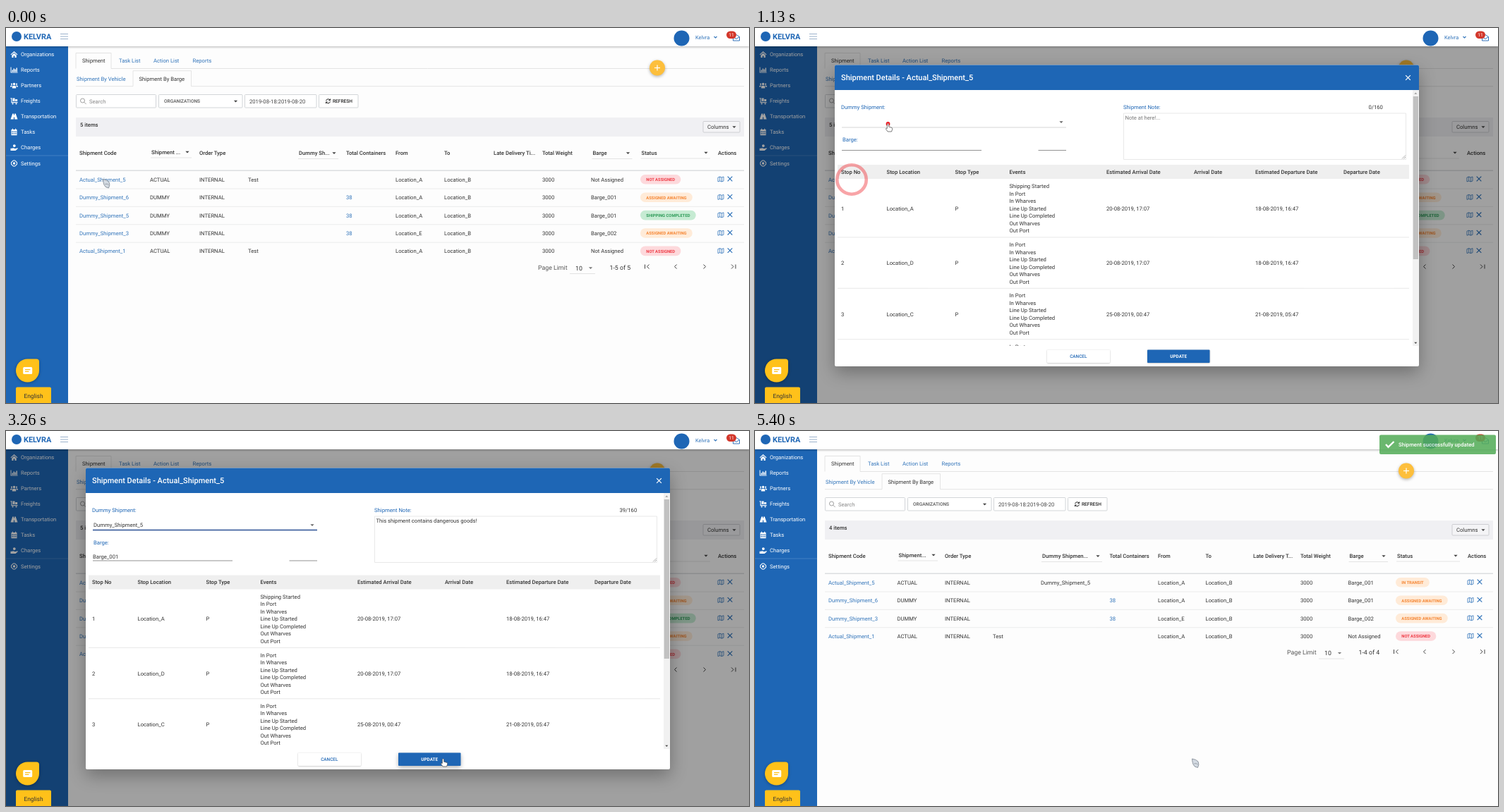
Recreate the animation shown at these times as an HTML page with a canvas. Size 1053 by 532 pixels, loop 5730 ms.

```html
<!DOCTYPE html>
<html lang="en">
<head>
<meta charset="utf-8">
<title>Shipment update</title>
<style>
html, body { margin: 0; width: 100%; height: 100%; overflow: hidden; background: #fff; }
canvas { display: block; }
</style>
</head>
<body>
<canvas id="stage" width="1053" height="532"></canvas>
<script>
const W = 1053, H = 532, LOOP = 5730, STEP = 200 / 3;
const BLUE = '#1e66b5', LINK = '#3174ba', INK = '#333', RULE = '#ddd', FS = 7.68;
const stage = document.getElementById('stage');
const buffer = Object.assign(document.createElement('canvas'), { width: W, height: H }).getContext('2d');
let c = stage.getContext('2d');
c.textRendering = buffer.textRendering = 'geometricPrecision';

const clamp = v => Math.max(0, Math.min(1, v));
const span = (t, from, length) => clamp((t - from) / length);
const mix = (a, b, p) => a + (b - a) * p;
const smooth = p => p * p * (3 - 2 * p);

// Drawing helpers; text y is the middle of the capitals
function text(s, x, y, color = INK, size = FS, weight = 400, align = 'left') {
  c.font = `${weight} ${size}px Roboto, sans-serif`;
  c.textAlign = align;
  c.fillStyle = color;
  c.fillText(s, x, y + size * .36);
}
function line(color, width, ...p) {
  c.beginPath();
  for (let i = 0; i < p.length; i += 2) c.lineTo(p[i], p[i + 1]);
  c.strokeStyle = color;
  c.lineWidth = width;
  c.stroke();
}
function box(x, y, w, h, fill, stroke, r = 0) {
  c.beginPath();
  c.roundRect(x, y, w, h, r);
  if (fill) { c.fillStyle = fill; c.fill(); }
  if (stroke) { c.strokeStyle = stroke; c.lineWidth = .8; c.stroke(); }
}
function disc(x, y, r, fill) {
  c.beginPath();
  c.arc(x, y, r, 0, 7);
  c.fillStyle = fill;
  c.fill();
}
function icon(d, x, y, fill, stroke, width = .8) {
  const p = new Path2D(d);
  c.save();
  c.translate(x, y);
  if (fill) { c.fillStyle = fill; c.fill(p, 'evenodd'); }
  if (stroke) { c.strokeStyle = stroke; c.lineWidth = width; c.stroke(p); }
  c.restore();
}
function shadowed(blur, dy, draw) {
  c.save();
  c.shadowColor = 'rgba(0,0,0,.3)';
  c.shadowBlur = blur;
  c.shadowOffsetY = dy;
  draw();
  c.restore();
}
function layer(alpha, draw) {
  const main = c;
  c = buffer;
  c.resetTransform();
  c.clearRect(0, 0, W, H);
  draw();
  c = main;
  c.globalAlpha = alpha;
  c.drawImage(buffer.canvas, 0, 0);
  c.globalAlpha = 1;
}
const caret = (x, y, color = '#444') => icon('M-2.6-1.2H2.6L0 1.5Z', x, y, color);
const cross = (x, y, r, color, width) => {
  line(color, width, x - r, y - r, x + r, y + r);
  line(color, width, x - r, y + r, x + r, y - r);
};

const NAV = [
  ['Organizations', 37.5, 'M0 5L5 .5L10 5L9.2 5.8L5 2.2L.8 5.8ZM1.8 6L5 3.3L8.2 6V9.5H6V7H4V9.5H1.8Z'],
  ['Reports', 59.5, 'M0 1H1V8H10V9H0ZM2 5H3.4V7.4H2ZM4 3H5.4V7.4H4ZM6 4H7.4V7.4H6ZM8 2H9.4V7.4H8Z'],
  ['Partners', 81.5, 'M3.3 3a1.7 1.7 0 1 0 3.4 0a1.7 1.7 0 1 0-3.4 0M2.3 9V7.5Q2.3 5.3 5 5.3T7.7 7.5V9ZM.4 3.2a1.1 1.1 0 1 0 2.2 0a1.1 1.1 0 1 0-2.2 0M7.4 3.2a1.1 1.1 0 1 0 2.2 0a1.1 1.1 0 1 0-2.2 0M-.5 7V6Q0 4.8 2.6 5L1.6 7ZM10.5 7V6Q10 4.8 7.4 5L8.4 7Z'],
  ['Freights', 103.5, 'M0 .8H2V6.6H10V7.8H.9V2H0ZM3 1H6V5.6H3ZM6.6 2.5H9.6V5.6H6.6ZM2 9a1 1 0 1 0 2 0a1 1 0 1 0-2 0M7 9a1 1 0 1 0 2 0a1 1 0 1 0-2 0'],
  ['Transportation', 125.5, 'M2.8 1H4.5V3H5.5V1H7.2L10 9H5.6V6H4.4V9H0Z'],
  ['Tasks', 147.5, 'M1 1.5H2.3V.3H3.5V1.5H6.5V.3H7.7V1.5H9V9.7H1ZM2 4H3.4V5.4H2ZM4.3 4H5.7V5.4H4.3ZM6.6 4H8V5.4H6.6ZM2 6.6H3.4V8H2ZM4.3 6.6H5.7V8H4.3ZM6.6 6.6H8V8H6.6Z'],
  ['Charges', 169.5, 'M0 6.2H1.8Q4 5 5.6 6.6H7.6L10 5.6V7L7 9.4H0ZM3.4 2.6a1.9 1.9 0 1 0 3.8 0a1.9 1.9 0 1 0-3.8 0'],
  ['Settings', 192, 'M3.6.5H6.4L9.5 3.6V6.4L6.4 9.5H3.6L.5 6.4V3.6ZM4 1.5L1.5 4V6L4 8.5H6L8.5 6V4L6 1.5ZM3.2 5a1.8 1.8 0 1 0 3.6 0a1.8 1.8 0 1 0-3.6 0']
];
const CHIPS = {
  'NOT ASSIGNED': ['#fdd9dc', '#ef3b45'],
  'SHIPPING COMPLETED': ['#c6ebd3', '#2c9a57'],
  other: ['#ffebd8', '#f58634']
};
const row = s => s.split('|');
const BEFORE = {
  cols: [104, 204, 274, 343, 415, 482, 552, 621, 691, 760, 829, 899, 1009],
  heads: row('Shipment Code||Order Type|||Total Containers|From|To|Late Delivery Ti...|Total Weight|||Actions'),
  filters: [['Shipment ...', 206, 257, 176], ['Dummy Sh...', 415, 465, 177.5], ['Barge', 831.5, 881.5, 177.5], ['Status', 900.5, 992, 177]],
  rows: [
    'Actual_Shipment_5|ACTUAL|INTERNAL|Test|||Location_A|Location_B||3000|Not Assigned|NOT ASSIGNED',
    'Dummy_Shipment_6|DUMMY|INTERNAL|||38|Location_A|Location_B||3000|Barge_001|ASSIGNED AWAITING',
    'Dummy_Shipment_5|DUMMY|INTERNAL|||38|Location_A|Location_B||3000|Barge_001|SHIPPING COMPLETED',
    'Dummy_Shipment_3|DUMMY|INTERNAL|||38|Location_E|Location_B||3000|Barge_002|ASSIGNED AWAITING',
    'Actual_Shipment_1|ACTUAL|INTERNAL|Test|||Location_A|Location_B||3000|Not Assigned|NOT ASSIGNED'
  ].map(row)
};
const AFTER = {
  cols: [104, 201.5, 269, 337, 405, 502.5, 571, 638.5, 706, 773, 840.5, 908, 1010],
  heads: BEFORE.heads.map(h => h.replace('y Ti', 'y T')),
  filters: [['Shipment...', 203.5, 253, 176], ['Dummy Shipmen...', 407, 486, 177.5], ['Barge', 842.5, 891, 177.5], ['Status', 910, 993, 177]],
  rows: [
    'Actual_Shipment_5|ACTUAL|INTERNAL||Dummy_Shipment_5||Location_A|Location_B||3000|Barge_001|IN TRANSIT',
    ...[1, 3, 4].map(i => BEFORE.rows[i].join('|'))
  ].map(row)
};

function drawTable({ cols, heads, filters, rows }) {
  const n = rows.length;
  text(n + ' items', 105, 137.5, INK, FS, 500);
  heads.forEach((h, i) => text(h, cols[i], 177, INK, FS, 500));
  for (const [label, x, arrow, y] of filters) {
    text(label, x, y, INK, FS, 500);
    caret(arrow, y);
    line(RULE, .8, x - 1, y + 8, arrow + 6, y + 8);
  }
  line('#dcdee0', 1.6, 99, 202.3, 1046, 202.3);
  rows.forEach((cells, r) => {
    const y = 215 + 25.4 * r;
    cells.forEach((s, i) => {
      if (i < 11) return text(s, cols[i], y, i == 0 || i == 5 ? LINK : INK);
      const [bg, fg] = CHIPS[s] || CHIPS.other;
      c.font = '700 5.85px Roboto, sans-serif';
      box(cols[i], y - 7, c.measureText(s).width + 16.5, 13.6, bg, 0, 6.8);
      text(s, cols[i] + 8.3, y, fg, 5.85, 700);
    });
    const x = cols[12];
    icon('M0 1L2.7 0L5.4 1L8 0V6L5.4 7L2.7 6L0 7ZM2.7 0V6M5.4 1V7', x, y - 4, 0, LINK);
    cross(x + 17, y - 1, 3.3, LINK, 1.2);
    if (r < n - 1) line('#e6e7e8', .8, 99, y + 13, 1046, y + 13);
  });
  const y = 212.5 + 25.4 * n;
  text('Page Limit', 754, y, '#555', 8.77);
  text('10', 807, y + 1, INK, 8.77);
  caret(828.5, y + 1, '#777');
  line(RULE, .8, 799, y + 9, 835, y + 9);
  text(`1-${n} of ${n}`, 855.5, y, INK, 8.77);
  icon('M-3-3V3M3-3L0 0L3 3', 908.5, y - 1, 0, '#444', 1);
  icon('M1.5-3L-1.5 0L1.5 3', 949, y - 1, 0, '#444', 1);
  icon('M-1.5-3L1.5 0L-1.5 3', 990, y - 1, 0, '#444', 1);
  icon('M3-3V3M-3-3L0 0L-3 3', 1031, y - 1, 0, '#444', 1);
}

function drawPage(t) {
  box(0, 0, W, H, '#fdfdfd');
  box(0, 26, 88, H - 26, BLUE);
  for (const [label, y, shape] of NAV) {
    icon(shape, 6.5, y - 5, '#fff');
    text(label, 21, y, '#fff');
  }
  line('#4b87c6', .8, 0, 181, 88, 181);

  line(RULE, .8, 99, 57.5, 99, 35.5, 149, 35.5, 149, 57.5, 1046, 57.5);
  text('Shipment', 108, 46.5);
  text('Task List', 160, 46.5, LINK);
  text('Action List', 209, 46.5, LINK);
  text('Reports', 264.5, 46.5, LINK);
  line(RULE, .8, 99, 82.7, 180, 82.7, 180, 60.7, 262.5, 60.7, 262.5, 82.7, 1046, 82.7);
  text('Shipment By Vehicle', 100, 72, LINK);
  text('Shipment By Barge', 188.5, 72);
  shadowed(4, 1.5, () => disc(923, 56.5, 11, '#fdbf3c'));
  line('#fff', 1.2, 919, 56.5, 927, 56.5);
  line('#fff', 1.2, 923, 52.5, 923, 60.5);

  for (const [x, w] of [[99.5, 113], [216.5, 118.5], [338.5, 101.5], [443.5, 55.5]]) box(x, 94.5, w, 18.5, '#fff', '#c8ccd0', 1);
  icon('M.5 3.5a3 3 0 1 0 6 0a3 3 0 1 0-6 0M5.6 5.6L8.6 8.6', 105, 99.5, 0, '#888');
  text('Search', 118, 104, '#888');
  text('ORGANIZATIONS', 224, 104, '#555', 6.58, 500);
  caret(325.5, 104);
  text('2019-08-18:2019-08-20', 345, 104, '#444');
  icon('M.6 3A3 3 0 0 1 6 1.8M6.4 4A3 3 0 0 1 1 5.2M6.5.2V2.3H4.4M.5 6.8V4.7H2.6', 453, 100.3, 0, '#222', 1);
  text('REFRESH', 463, 104, '#222', 6.58, 500);
  box(99, 127, 947, 27, '#f0f0f3');
  box(988, 132.5, 52, 15.5, '#f4f4f6', '#c4c6ca', 1);
  text('Columns', 994, 140.5);
  caret(1032, 140.5);
  drawTable(t < 5120 ? BEFORE : AFTER);
}

// Parts that stay bright above the dimmed page
function drawChrome() {
  shadowed(3, 1, () => box(0, 0, W, 26, '#fff'));
  disc(15, 12, 7, BLUE);
  text('KELVRA', 25, 12.5, BLUE, 10.9, 700);
  for (const y of [8.5, 12, 15.5]) line('#8fa9c6', .9, 77, y, 88, y);
  disc(957.5, 14.5, 11, BLUE);
  text('Kelvra', 977, 13, LINK, 7.4);
  icon('M-2-1L0 1L2-1', 1005.5, 13, 0, LINK, 1.1);
  icon('M0 3L4.5 0L9 3V8.5H0ZM0 3L4.5 6L9 3', 1030.5, 9.5, '#fff', BLUE, .9);
  box(1021, 4.5, 14, 10.5, '#d3372b', 0, 5.2);
  text('11', 1028, 9.8, '#fff', 6.6, 400, 'center');
  shadowed(4, 1, () => box(14, 469.5, 33, 33, '#ffc11a', 0, [16.5, 4, 16.5, 16.5]));
  icon('M1.5 0H11.5Q13 0 13 1.5V8.5Q13 10 11.5 10H1.5Q0 10 0 8.5V1.5Q0 0 1.5 0ZM2.8 3H10.2V4.2H2.8ZM2.8 5.7H8.2V6.9H2.8Z', 24.2, 481, '#fff');
  box(14, 509.5, 50, 23, '#ffc11a', 0, [2, 2, 0, 0]);
  text('English', 39, 522, '#333', 8.4, 400, 'center');
}

const STOP_COLS = [122, 186.5, 283.5, 360.5, 498, 622, 709, 834];
const STOP_HEADS = row('Stop No|Stop Location|Stop Type|Events|Estimated Arrival Date|Arrival Date|Estimated Departure Date|Departure Date');
const EVENTS = row('Shipping Started|In Port|In Wharves|Line Up Started|Line Up Completed|Out Wharves|Out Port');
const STOPS = [
  ['Location_A', '20-08-2019, 17:07', '18-08-2019, 16:47'],
  ['Location_D', '20-08-2019, 17:07', '18-08-2019, 16:47'],
  ['Location_C', '25-08-2019, 00:47', '21-08-2019, 05:47'],
  ['Location_B', '', '']
];

function drawModal(t) {
  const filled = t > 2290, dy = filled ? 10.5 : 0;
  shadowed(24, 9, () => box(113, 52.5, 828, 427.5, '#fff', 0, 2));
  box(113, 52.5, 828, 35.5, BLUE, 0, [2, 2, 0, 0]);
  text('Shipment Details - Actual_Shipment_5', 122, 70.5, '#fff', 10.97, 500);
  cross(925.5, 70.5, 3.4, '#fff', 1.2);

  text('Dummy Shipment:', 122, 112.5, BLUE);
  if (filled) text('Dummy_Shipment_5', 124, 133.5);
  caret(434, 133.5, '#666');
  if (t > 2400) line('#2a4f94', 1.3, 123, 140.5, 441, 140.5);
  else line('#ccc', .8, 123, 141, 441, 141);
  text('Barge:', 124, 158.5, BLUE);
  if (filled) text('Barge_001', 123, 178.5);
  line('#777', .8, 123, 173.5 + dy, 441, 173.5 + dy);

  text('Shipment Note:', 522, 112.5, BLUE);
  text((filled ? 39 : 0) + '/160', 869.5, 112.5);
  box(522.5, 121, 400, 65.5, '#fff', '#e4e4e4');
  if (filled) text('This shipment contains dangerous goods!', 524.5, 127.5);
  else text('Note at here!...', 524.5, 127.5, '#777');
  icon('M0 5L5 0M2.5 5L5 2.5', 917, 180.5, 0, '#777', .6);

  c.save();
  c.beginPath();
  c.rect(113, 88, 828, 363);
  c.clip();
  box(117, 194 + dy, 810, 20, '#efefef');
  STOP_HEADS.forEach((h, i) => text(h, STOP_COLS[i], 204 + dy, INK, FS, 500));
  let top = 214 + dy;
  STOPS.forEach(([place, arrival, departure], i) => {
    const events = EVENTS.slice(i ? 1 : 0);
    const height = events.length * 10.5 + 9.4, mid = top + height / 2 + .3;
    events.forEach((e, k) => text(e, STOP_COLS[3], top + 10.4 + k * 10.5));
    [i + 1, place, 'P', , arrival, , departure].forEach((s, k) => text(s, STOP_COLS[k], mid));
    top += height;
    line('#e2e2e2', .8, 117, top, 927, top);
  });
  c.restore();

  box(932, 88, 8.5, 363, '#f1f1f1');
  box(932.7, 97, 7.3, filled ? 226 : 231, '#c1c1c1');
  icon('M-2 1H2L0-1.2Z', 936.3, 92.8, '#999');
  icon('M-2-1H2L0 1.2Z', 936.3, 446.8, '#444');
  shadowed(2, .6, () => box(414, 456.5, 89, 18.5, '#fff', 0, 1));
  text('CANCEL', 458.3, 465.8, BLUE, 6.4, 500, 'center');
  const hover = t > 3120;
  shadowed(hover ? 6 : 2, hover ? 2.5 : .6, () => box(556, 456.5, 88.5, 18.5, BLUE, 0, 1));
  text('UPDATE', 600.2, 465.8, '#fff', 6.4, 700, 'center');
}

function drawOptions(t) {
  shadowed(5, 2, () => box(115, 64, 336, 114, '#fff'));
  text('- Select Dummy Shipment Code -', 117.5, 85.5, '#777');
  line(RULE, .8, 115, 95.5, 451, 95.5);
  box(115, 120.5, 336, 26, '#e4e4e8');
  if (t > 2290) box(115, 120.5, 297, 26, '#b4b4b8');
  text('Dummy_Shipment_5', 124, 133.5);
  text('Dummy_0001', 124, 160);
}

// Click rings: place, start, end
const CLICKS = [[137, 215, 390, 1640], [188.5, 136, 1108, 2390], [188.5, 136, 2190, 3255], [620.5, 466, 3990, 5260]];
function drawClicks(t) {
  for (const [x, y, from, to] of CLICKS) {
    if (t < from || t >= to) continue;
    const p = span(t, from, 1380);
    c.beginPath();
    c.arc(x, y, 1.2 + 25 * (1 - (1 - p) ** 2), 0, 7);
    c.strokeStyle = `rgba(238,28,36,${(1 - p) ** 1.2})`;
    c.lineWidth = mix(6.5, 3, p) * span(t, from - 10, 90);
    c.stroke();
  }
}
function drawCursor(t) {
  const a = smooth(span(t, 760, 300)), b = smooth(span(t, 2600, 660));
  const x = mix(mix(137.5, 188.5, a), 619.5, b), y = mix(mix(214.5, 136, a), 465, b);
  if (t < 390 || t > 4300) icon('M0 0Q6 1 8.5 4Q10.5 8 8 12.5Q3 12 1.5 8Q0 4 0 0ZM3 7Q6 6 8 8', x, y, '#d3dae2', '#6d7682', .7);
  else icon('M-1.2 1Q0-1 1.2 1V4.2L5.6 5.5Q6.6 6.2 6 8.2L5 11H-.4L-3 7.4Q-3.2 5.6-1.2 6.4Z', x, y, '#fff', '#444', .7);
}
function drawToast() {
  box(885, 5.5, 165, 27.5, '#55ad59', 0, 2);
  icon('M-5.5 0L-2 3.8L6-4', 899.5, 19, 0, '#fff', 2.4);
  text('Shipment successfully updated', 912, 19, '#fff', FS, 500);
}

function draw(t) {
  drawPage(t);
  const open = 1 - (1 - span(t, 393, 345)) ** 2;
  const shown = t < 4050 ? open : (1 - span(t, 4058, 210)) ** 2.5;
  const dim = t < 4050 ? span(t, 330, 180) : 1 - span(t, 4030, 90);
  box(0, 26, W, H - 26, `rgba(0,0,0,${.37 * dim})`);
  drawChrome();
  if (shown > 0) layer(shown, () => {
    const s = .5 + shown / 2;
    c.translate(527, 266.5);
    c.scale(s, s);
    c.translate(-527, -266.5);
    drawModal(t);
  });
  const options = span(t, 1150, 180) * (1 - span(t, 2260, 165));
  if (options > 0) layer(options, () => drawOptions(t));
  if (t > 450 && t < 4050) box(321, 166.5, 80.5, 23.5, '#fff', 0, 3);
  const toast = span(t, 4500, 300);
  if (toast > 0) layer(.87 * toast, drawToast);
  drawClicks(t);
  drawCursor(t);
}

function pictureTime(t) {
  const steps = from => from + Math.floor((t - from) / STEP) * STEP;
  if (t < 260) return 0;
  return t < 3860 ? Math.min(3260, steps(260)) : Math.min(5400, steps(3860));
}
const start = performance.now();
function frame() {
  draw(pictureTime((performance.now() - start) % LOOP));
  requestAnimationFrame(frame);
}
frame();
</script>
</body>
</html>
```
